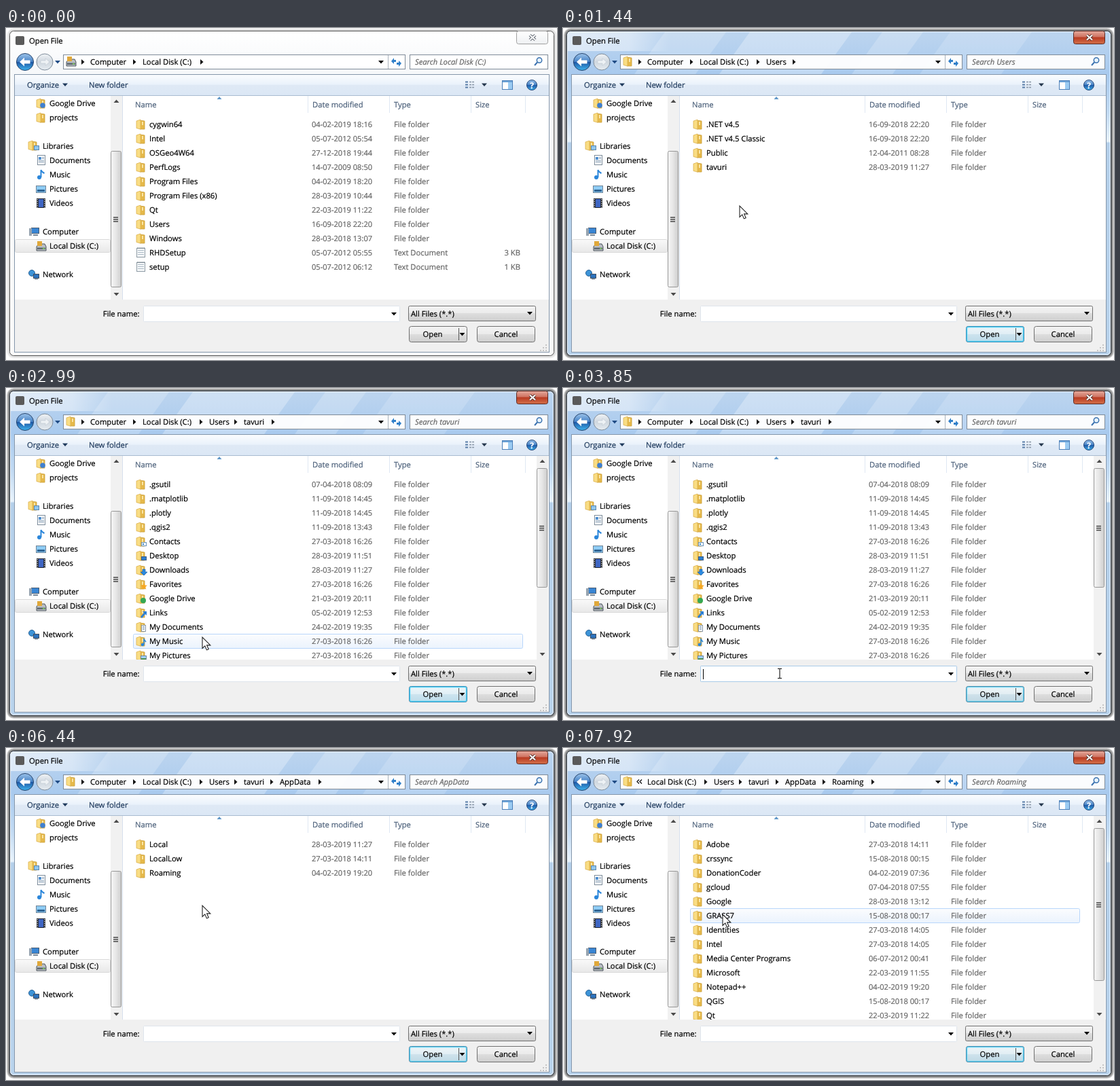
An HTML page for the animation above (8 s loop, 811 by 489 pixels).

```html
<!DOCTYPE html>
<html lang="en">
<head>
<meta charset="utf-8">
<title>Open File</title>
<style>
html, body { margin: 0; width: 100%; height: 100%; overflow: hidden; background: #fff; }
svg { display: block; width: 811px; height: 489px; }
text { font: 11.25px "Open Sans", "Noto Sans", sans-serif; text-rendering: geometricPrecision; white-space: pre; stroke-width: .22px; }
.italic { font-style: italic; }
.date { font-size: 11.1px; }
.help { font-weight: 700; font-size: 12px; }
</style>
</head>
<body>
<svg id="stage" viewBox="0 0 811 489" xmlns="http://www.w3.org/2000/svg"></svg>
<script>
const LOOP = 8000;
const USER = 'tavuri';
const INK = '#000', DIM = '#666', NAVY = '#1e395b';

// Drawing helpers
const rect = (x, y, w, h, fill, more = '') => `<rect x="${x}" y="${y}" width="${w}" height="${h}" fill="${fill}" ${more}/>`;
const box = (x, y, w, h, fill, stroke, r = 0, more = '') => rect(x + .5, y + .5, w - 1, h - 1, fill, `stroke="${stroke}" rx="${r}" ${more}`);
const path = (d, fill, more = '') => `<path d="${d}" fill="${fill}" ${more}/>`;
const line = (d, stroke, w = 1, more = '') => path(d, 'none', `stroke="${stroke}" stroke-width="${w}" ${more}`);
const circle = (x, y, r, fill, more = '') => `<circle cx="${x}" cy="${y}" r="${r}" fill="${fill}" ${more}/>`;
const text = (x, y, s, fill = INK, more = '') => `<text x="${x}" y="${y}" fill="${fill}" stroke="${fill}" ${more}>${s}</text>`;
const group = (id, inner) => `<g id="${id}">${inner}</g>`;
const down = (x, y, fill = '#000') => path(`M${x - 4} ${y - 2}h8l-4 4.5z`, fill);
const right = (x, y = 50) => path(`M${x - 2} ${y - 4}v8l4.5-4z`, '#111');
const grad = (id, stops, flat) => `<linearGradient id="${id}" x2="${flat ? 1 : 0}" y2="${flat ? 0 : 1}">` +
  stops.map(([o, c, a = 1]) => `<stop offset="${o}" stop-color="${c}" stop-opacity="${a}"/>`).join('') + '</linearGradient>';

// Icons, centred on x, y
const folder = (x, y) =>
  path(`M${x - 1} ${y - 6}l7 1v12h-7z`, '#e6b94a', 'stroke="#c99c35" stroke-width=".8"') +
  path(`M${x - 6} ${y - 5}l6-2v14l-6-1.5z`, '#f9dd84', 'stroke="#dcb04c" stroke-width=".8"') +
  line(`M${x + 3} ${y - 4}v5`, '#fff3c4', 1.5);
const note = (x, y) =>
  box(x - 6, y - 7, 13, 14, '#f7f9fa', '#8c99a3') +
  line(`M${x - 4} ${y - 3.5}h9m-9 3h9m-9 3h9`, '#a9b8c4') +
  line(`M${x - 5} ${y - 7}h11`, '#6f7c86', 1.5, 'stroke-dasharray="1 1"');
const sheet = (x, y) =>
  box(x - 5, y - 8, 12, 15, '#fdfeff', '#7c8b99') + rect(x - 3, y - 5, 4, 4, '#4f8fd0') +
  line(`M${x + 2} ${y - 4.5}h3m-3 2h3m-8 3h8m-8 2h8`, '#8aa0b5');
const drive = (x, y) =>
  path(`M${x - 6} ${y + 1}l3-4h9l2 4v6h-14z`, '#b9bec4', 'stroke="#4a525a"') +
  rect(x - 5, y + 2.5, 12, 2.5, '#5f6871') + rect(x + 3, y + 3, 3, 1.5, '#7fd35a') +
  rect(x - 5, y - 7, 7, 7, '#e0a83a');
const screen = (x, y) =>
  box(x - 4, y - 6, 12, 9, '#3a86d4', '#4a5d74') + rect(x - 7, y - 5, 4, 11, '#98a4b0') + rect(x - 1, y + 4, 7, 2, '#7a8998');
const globe = (x, y) =>
  circle(x - 3, y - 2, 4.5, '#3d94d8', 'stroke="#2c6396"') + box(x - 1, y - 1, 9, 7, '#2b72bd', '#3f4f63') + rect(x + 1, y + 6, 5, 1.5, '#8796a5');
const badges = {
  Contacts: (x, y) => box(x, y, 8, 6, '#f3f9ff', '#6b93b8') + rect(x + 2, y + 2, 2, 2, '#3a86c8'),
  Desktop: (x, y) => box(x, y, 8, 6, '#2d7fd0', '#3c5c86'),
  Downloads: (x, y) => path(`M${x + 2} ${y - 2}h4v4h3l-5 5-5-5h3z`, '#2b8ae0', 'stroke="#1a5fa8" stroke-width=".7"'),
  Favorites: (x, y) => path(`M${x + 4} ${y - 3}l1.5 3.4 3.5.3-2.7 2.4.9 3.6-3.2-2-3.2 2 .9-3.6L${x - 1} ${y + .7}l3.5-.3z`, '#f6a722'),
  'Google Drive': (x, y) => circle(x + 3, y + 2, 4, '#35a853'),
  Links: (x, y) => path(`M${x + 2} ${y - 3}h6v6l-2-2-5 6-2-2 5-6z`, '#2b7fd6'),
  'My Documents': (x, y) => box(x, y - 4, 7, 10, '#fbfdff', '#8a98a6') + line(`M${x + 2} ${y - 1.5}h3m-3 2h3m-3 2h3`, '#7f9ab5'),
  'My Music': (x, y) => circle(x + 2, y + 4, 2.3, '#2a86da') + line(`M${x + 4} ${y + 4}v-8l3 4`, '#2a86da', 1.5),
  'My Pictures': (x, y) => box(x - 1, y - 1, 9, 7, '#9fd0f5', '#7088a0') + rect(x, y + 3, 7, 2, '#4c8f52'),
};

// Pages: start time, time the last breadcrumb arrow shows, crumbs, files
const rootCrumbs = [['Computer', 124], ['Local Disk (C:)', 201], ['Users', 299], [USER, 350], ['AppData', 403]];
const pages = [
  { from: 0, tail: 0, end: 288, icon: drive, search: 'Local Disk (C:)', crumbs: rootCrumbs.slice(0, 2), files: [
    'cygwin64|04-02-2019 18:16', 'Intel|05-07-2012 05:54', 'OSGeo4W64|27-12-2018 19:44', 'PerfLogs|14-07-2009 08:50',
    'Program Files|04-02-2019 18:20', 'Program Files (x86)|28-03-2019 10:44', 'Qt|22-03-2019 11:22', 'Users|16-09-2018 22:20',
    'Windows|28-03-2018 13:07', 'RHDSetup|05-07-2012 05:55|3 KB', 'setup|05-07-2012 06:12|1 KB'] },
  { from: 1250, tail: 1350, end: 340, icon: folder, search: 'Users', crumbs: rootCrumbs.slice(0, 3), files: [
    '.NET v4.5|16-09-2018 22:20', '.NET v4.5 Classic|16-09-2018 22:20', 'Public|12-04-2011 08:28', USER + '|28-03-2019 11:27'] },
  { from: 2290, tail: 2450, end: 393, icon: folder, search: USER, thumb: 176, crumbs: rootCrumbs.slice(0, 4), files: [
    '.gsutil|07-04-2018 08:09', '.matplotlib|11-09-2018 14:45', '.plotly|11-09-2018 14:45', '.qgis2|11-09-2018 13:43',
    'Contacts|27-03-2018 16:26', 'Desktop|28-03-2019 11:51', 'Downloads|28-03-2019 11:27', 'Favorites|27-03-2018 16:26',
    'Google Drive|21-03-2019 20:11', 'Links|05-02-2019 12:53', 'My Documents|24-02-2019 19:35', 'My Music|27-03-2018 16:26',
    'My Pictures|27-03-2018 16:26'] },
  { from: 5510, tail: 5820, end: 462, icon: folder, search: 'AppData', crumbs: rootCrumbs, files: [
    'Local|28-03-2019 11:27', 'LocalLow|27-03-2018 14:11', 'Roaming|04-02-2019 19:20'] },
  { from: 6900, tail: 7040, end: 456, icon: folder, search: 'Roaming', thumb: 225, cut: true,
    crumbs: [['Local Disk (C:)', 124], ['Users', 222], [USER, 273], ['AppData', 327], ['Roaming', 396]], files: [
    'Adobe|27-03-2018 14:11', 'crssync|15-08-2018 00:15', 'DonationCoder|04-02-2019 07:36', 'gcloud|07-04-2018 07:55',
    'Google|28-03-2018 13:12', 'GRASS7|15-08-2018 00:17', 'Identities|27-03-2018 14:05', 'Intel|27-03-2018 14:05',
    'Media Center Programs|06-07-2012 00:41', 'Microsoft|22-03-2019 11:55', 'Notepad++|04-02-2019 19:20', 'QGIS|15-08-2018 00:17',
    'Qt|22-03-2019 11:22'] },
];
const BADGES_AT = 2700, ACTIVE_AT = 1000;

const scrollbar = (x, top, h) => {
  const mid = top + h / 2;
  return rect(x, 100, 17, 300, '#f1f1f1') +
    path(`M${x + 4.5} 110l4-4.5 4 4.5z`, '#4b4b4b') + path(`M${x + 4.5} 390l4 4.5 4-4.5z`, '#4b4b4b') +
    box(x, top, 16, h, 'url(#thumb)', '#979797', 2) +
    line(`M${x + 4} ${mid - 2.5}h7m-7 3h7m-7 3h7`, '#444', 1.3);
};

const fileRow = (row, i) => {
  const [name, date, size] = row.split('|'), y = 142 + 21 * i;
  return (size ? note : folder)(198, y) + text(211, y + 4, name) + text(450, y + 4, date, DIM, 'class="date"') +
    text(571, y + 4, size ? 'Text Document' : 'File folder', DIM) + (size ? text(757, y + 4, size, DIM, 'text-anchor="end"') : '');
};

const pageView = (p, n) => {
  const arrows = p.crumbs.map(([, x], i) => i ? right(x - 12) : p.cut ? line('M112 46.5l-3 3 3 3m4-6l-3 3 3 3', '#111', 1.3) : right(x - 11)).join('');
  const marks = n === 2 ? p.files.map((f, i) => {
    const badge = badges[f.split('|')[0]];
    return badge ? badge(199, 143 + 21 * i) : '';
  }).join('') : '';
  return group('page' + n,
    p.icon(95, 49) + arrows + p.crumbs.map(([s, x]) => text(x, 54, s)).join('') + group('tail' + n, right(p.end)) +
    text(602, 54, 'Search ' + p.search, DIM, 'class="italic"') +
    `<g clip-path="url(#list)">${p.files.map(fileRow).join('')}${group('marks' + n, marks)}</g>` +
    (p.thumb ? scrollbar(781, 118, p.thumb) : ''));
};

const shadow = a => [9, 7, 5, 3].map(w => box(5, 4, 802, 479, 'none', '#000', 6, `stroke-width="${w}" stroke-opacity="${a}"`)).join('');
const frame = (id, fill, edge, shade, inner) => group(id, shadow(shade) +
  box(5, 4, 802, 479, fill, edge, 6) + box(6, 5, 800, 477, 'none', '#fff', 5, 'stroke-opacity=".8"') + inner);
const closeX = (stroke, fill) => {
  const d = 'M771 10.5l8 7m0-7l-8 7';
  return line(d, stroke, 4.2) + line(d, fill, 2.2);
};
// Slanted glass reflections across the title area
const streak = (x, w, a) => path(`M${x} 6h${w}l-45 62h${-w}z`, '#fff', `opacity="${a}"`);
const glass = streak(150, 90, .2) + streak(275, 150, .28) + streak(470, 60, .2) + streak(570, 120, .16) +
  rect(7, 6, 150, 28, 'url(#glow1)');

const item = (s, x, y, icon) => icon(x - 13, y) + text(x, y + 4, s);
const library = (x, y) => folder(x - 2, y - 1) + box(x, y - 1, 8, 7, '#8fc7ef', '#5b86ad');
const tune = (x, y) => circle(x - 2, y + 4, 3, '#2a86da') + line(`M${x + .5} ${y + 4}v-11q1 3 5 5`, '#2a86da', 2);
const photo = (x, y) => box(x - 7, y - 5, 15, 11, '#8ecbf4', '#708497') + rect(x - 5, y + 1, 11, 3, '#2f6493');
const film = (x, y) => rect(x - 6, y - 7, 13, 14, '#22262e') + rect(x - 3, y - 6, 7, 12, '#3f66c4') +
  line(`M${x - 4.7} ${y - 6}v13m10.4-13v13`, '#ddd', 1.3, 'stroke-dasharray="1.5 1.5"');
const syncFolder = (x, y) => folder(x, y) + circle(x + 3, y + 3, 3.8, '#3f7fd0');

const sidebar = rect(13, 100, 158, 300, '#fff') + box(13, 311, 141, 20, 'url(#chosen)', '#d9d9d9', 2) +
  item('Google Drive', 64, 111, syncFolder) + item('projects', 64, 132, folder) +
  item('Libraries', 54, 174, library) + item('Documents', 64, 195, sheet) + item('Music', 64, 216, tune) +
  item('Pictures', 64, 237, photo) + item('Videos', 64, 258, film) + item('Computer', 54, 300, screen) +
  item('Local Disk (C:)', 64, 321, drive) + item('Network', 54, 363, globe) +
  scrollbar(154, 181, 201) + rect(171, 100, 1, 300, '#d6e0ec');

const navRow = circle(28, 50, 12.5, 'url(#back)', 'stroke="#25436c"') +
  path('M20 50l7-6.5v4h8.5v5H27v4z', '#fff') +
  circle(57, 50, 12, 'url(#fwd)', 'stroke="#7f8d9b"') + path('M64 50l-6-5.5v3.5h-7v4h7v3.5z', '#eef2f5', 'stroke="#c3ccd4" stroke-width=".7"') +
  down(76, 50, '#1f4b85') +
  box(84, 39, 504, 22, '#fff', '#7f8b98', 0, 'fill-opacity=".95"') + down(552, 50) + rect(562, 40, 1, 20, '#a9b3bd') +
  path('M567 49l4-5v3h3v3h-3v3zM582 52l-4 5v-3h-3v-3h3v-3z', '#2f7fc9') +
  box(594, 39, 204, 22, '#fff', '#7f8b98', 0, 'fill-opacity=".95"') +
  circle(785, 47.5, 3.7, '#e8f4fd', 'stroke="#3c73b0" stroke-width="1.5"') + line('M782 50.5l-4 4.5', '#3c73b0', 2);

const toolbar = rect(13, 69, 786, 31, 'url(#bar)') + rect(13, 99, 786, 1, '#a9bbd0') +
  text(31, 88, 'Organize', NAVY) + down(87, 83.5, NAVY) + text(122, 88, 'New folder', NAVY) +
  line('M676 79.5h4m-4 4h4m-4 4h4', '#5a7ea8', 2) + line('M682 79.5h8m-8 4h8m-8 4h8', '#8795a5', 1.5, 'stroke-dasharray="3 1"') +
  down(704, 83.5, '#25374d') + box(730, 77, 16, 14, '#fff', '#4a7fb8') + rect(739, 78, 6, 12, '#9bcbf2') + rect(731, 78, 14, 2, '#6ea4d8') +
  circle(774, 84, 7.5, 'url(#back)', 'stroke="#24477a"') +
  text(774, 88.5, '?', '#fff', 'text-anchor="middle" class="help"');

const header = rect(172, 100, 627, 300, '#fff') +
  [['Name', 190], ['Date modified', 451], ['Type', 571], ['Size', 691]].map(([s, x]) => text(x, 117, s, '#4c607a')).join('') +
  [444, 564, 684, 764].map(x => rect(x, 100, 1, 25, '#dfe8f3')).join('') + path('M310.5 105l3.5-4 3.5 4z', '#5f97c9');

const grip = [[794, 466], [794, 470], [794, 474], [790, 470], [790, 474], [786, 474]].map(([x, y]) => rect(x, y, 2, 2, '#c4c4c4')).join('');
const footer = rect(13, 400, 786, 77, '#f0f0f0') + text(196.5, 425, 'File name:', INK, 'text-anchor="end"') +
  box(202, 409, 378, 24, '#fff', '#dfe5ec', 1) + group('focus', box(202, 409, 378, 24, 'none', '#a9cbe8', 1)) + down(571, 421) +
  box(592, 409, 188, 23, 'url(#button)', '#707070', 2) + text(596, 425, 'All Files (*.*)') + down(771, 420) +
  box(593, 439, 86, 24, 'url(#button)', '#707070', 3) +
  group('glow', box(593, 439, 86, 24, 'url(#hot)', '#2f7ba8', 3) + box(594, 440, 84, 22, 'none', '#4fd0f4', 2, 'stroke-width="1.5"')) +
  rect(666, 442, 1, 18, '#555') + down(671.5, 451) + text(628, 455, 'Open', INK, 'text-anchor="middle"') +
  box(693, 439, 86, 24, 'url(#button)', '#707070', 3) + text(736, 455, 'Cancel', INK, 'text-anchor="middle"') + grip +
  group('popup', box(206, 432, 357, 40, '#fff', '#c4c8cc')) +
  text(206, 425, '', INK, 'id="typed"') + rect(206, 414, 1, 15, '#000', 'id="caret"');

const defs = '<defs>' +
  grad('idle', [[0, '#fff'], [.12, '#f6f8fa'], [1, '#fafafa']]) +
  grad('aero', [[0, '#bdd5ef'], [.13, '#a9caee'], [.25, '#c3dbf3'], [.34, '#e9f3fc'], [.345, '#b5d0ea'], [1, '#b9d3ec']]) +
  grad('glow1', [[0, '#fff', .55], [.6, '#fff', .45], [1, '#fff', 0]], true) +
  grad('red', [[0, '#e5a99c'], [.45, '#cf7361'], [.5, '#b83a22'], [1, '#d4714a']]) +
  grad('grey', [[0, '#fff'], [1, '#eef0f2']]) +
  grad('bar', [[0, '#fafcfe'], [.45, '#eaf2fb'], [.5, '#dfe9f5'], [1, '#dbe7f5']]) +
  grad('back', [[0, '#9cc3ea'], [.48, '#4783c6'], [.5, '#1d55a3'], [1, '#3fb4ee']]) +
  grad('fwd', [[0, '#f0f3f6'], [.5, '#cfd7df'], [1, '#e6ecf1']]) +
  grad('thumb', [[0, '#f6f6f6'], [.5, '#e6e6e6'], [1, '#cdcdcd']], true) +
  grad('chosen', [[0, '#f9f9f9'], [1, '#e8e8e8']]) +
  grad('button', [[0, '#f3f3f3'], [.48, '#ebebeb'], [.5, '#dddddd'], [1, '#cfcfcf']]) +
  grad('hot', [[0, '#eef6fa'], [.48, '#e0eff6'], [.5, '#cde4ef'], [1, '#bcdcea']]) +
  grad('over', [[0, '#fbfcfe'], [1, '#ebf3fd']]) +
  '<clipPath id="list"><rect x="172" y="125" width="627" height="275"/></clipPath></defs>';

const ibeam = line('M-3 -6.5h2.5l.5.5.5-.5h2.5M0 -6v13M-3 7.5h2.5l.5-.5.5.5h2.5', '#111', 1.1);
const arrow = path('M0 0v16.5l3.8-3.6 2.6 6 2.8-1.2-2.6-5.8h5.2z', '#fff', 'stroke="#222" stroke-width="1.1"');

document.getElementById('stage').innerHTML = defs + rect(0, 0, 811, 489, '#fff') +
  frame('idleFrame', 'url(#idle)', '#555', .04, box(751, 4, 47, 20, 'url(#grey)', '#a0a0a0', 3) + closeX('#5f6670', '#fff')) +
  frame('liveFrame', 'url(#aero)', '#2d3742', .17,
    glass + box(751, 4, 47, 20, 'url(#red)', '#5c2a24', 3) + closeX('#54332f', '#fff')) +
  rect(14, 12, 13, 13, '#5a5a5a', 'rx="2"') + text(34, 23, 'Open File') +
  box(12, 68, 788, 410, '#fff', '#8496aa') + navRow + toolbar + header +
  box(187, 0, 574, 22, 'url(#over)', '#b8d6fb', 2, 'id="hover"') +
  pages.map(pageView).join('') + sidebar + footer +
  group('click', circle(0, 2, 12.5, '#ffe834', 'fill-opacity=".72"')) + group('arrow', arrow) + group('ibeam', ibeam);

// Motion tables: time, x, y
const track = [[70, 766, 474], [200, 680, 436], [400, 470, 352], [600, 312, 299], [680, 292, 289], [760, 273, 276], [840, 264, 283],
  [1350, 264, 283], [1680, 249, 207], [1830, 247, 200], [2400, 247, 200], [2700, 260, 262], [2900, 281, 338], [3090, 298, 398],
  [3400, 319, 420], [5960, 319, 420], [6250, 302, 300], [6590, 278, 179], [7540, 278, 179], [7920, 235, 245]];
const clicks = [[930, 1190], [2060, 2400], [3470, 3620], [6760, 6980]];
const keyTimes = [4170, 4340, 4560, 4870, 5040, 5190, 5360];
const within = (t, a, b) => t >= a && t < b;

function pointer(t) {
  const i = track.findIndex(k => k[0] > t);
  if (i === 0) return track[0].slice(1);
  if (i < 0) return track[track.length - 1].slice(1);
  const [a, ax, ay] = track[i - 1], [b, bx, by] = track[i], f = (t - a) / (b - a);
  return [ax + (bx - ax) * f, ay + (by - ay) * f].map(Math.round);
}

const el = id => document.getElementById(id);
const show = (id, on) => { el(id).style.display = on ? '' : 'none'; };

function draw(t) {
  const now = pages.filter(p => p.from <= t).length - 1;
  pages.forEach((p, n) => {
    show('page' + n, n === now);
    show('tail' + n, t >= p.tail);
  });
  show('marks2', t >= BADGES_AT);

  const live = t >= ACTIVE_AT;
  show('idleFrame', !live);
  show('liveFrame', live);
  show('glow', live);
  el('glow').style.opacity = .88 + .12 * Math.cos(t / 1500 * Math.PI * 2);

  const [x, y] = pointer(t), seen = t >= 70 && !within(t, 4560, 5960), inField = y > 408 && x > 202 && x < 562;
  for (const id of ['arrow', 'ibeam', 'click']) el(id).setAttribute('transform', `translate(${x} ${y})`);
  show('arrow', seen && !inField);
  show('ibeam', seen && inField);
  show('click', clicks.some(([a, b]) => within(t, a, b)));

  const row = Math.floor((y - 131.5) / 21);
  const over = seen && x >= 187 && x < 761 && y < 400 && row >= 0 && row < pages[now].files.length;
  show('hover', over);
  if (over) el('hover').setAttribute('y', 131.5 + 21 * row);

  const typing = within(t, 3500, 5510), typed = el('typed');
  typed.textContent = typing ? 'AppData'.slice(0, keyTimes.filter(k => k <= t).length) : '';
  show('focus', typing);
  show('caret', typing && !within(t, 4020, 4170));
  el('caret').setAttribute('x', 206 + Math.round(typed.textContent ? typed.getComputedTextLength() : 0));
  show('popup', within(t, 4170, 4420));
}

const start = performance.now();
function tick() {
  draw((performance.now() - start) % LOOP);
  requestAnimationFrame(tick);
}
tick();
</script>
</body>
</html>
```
